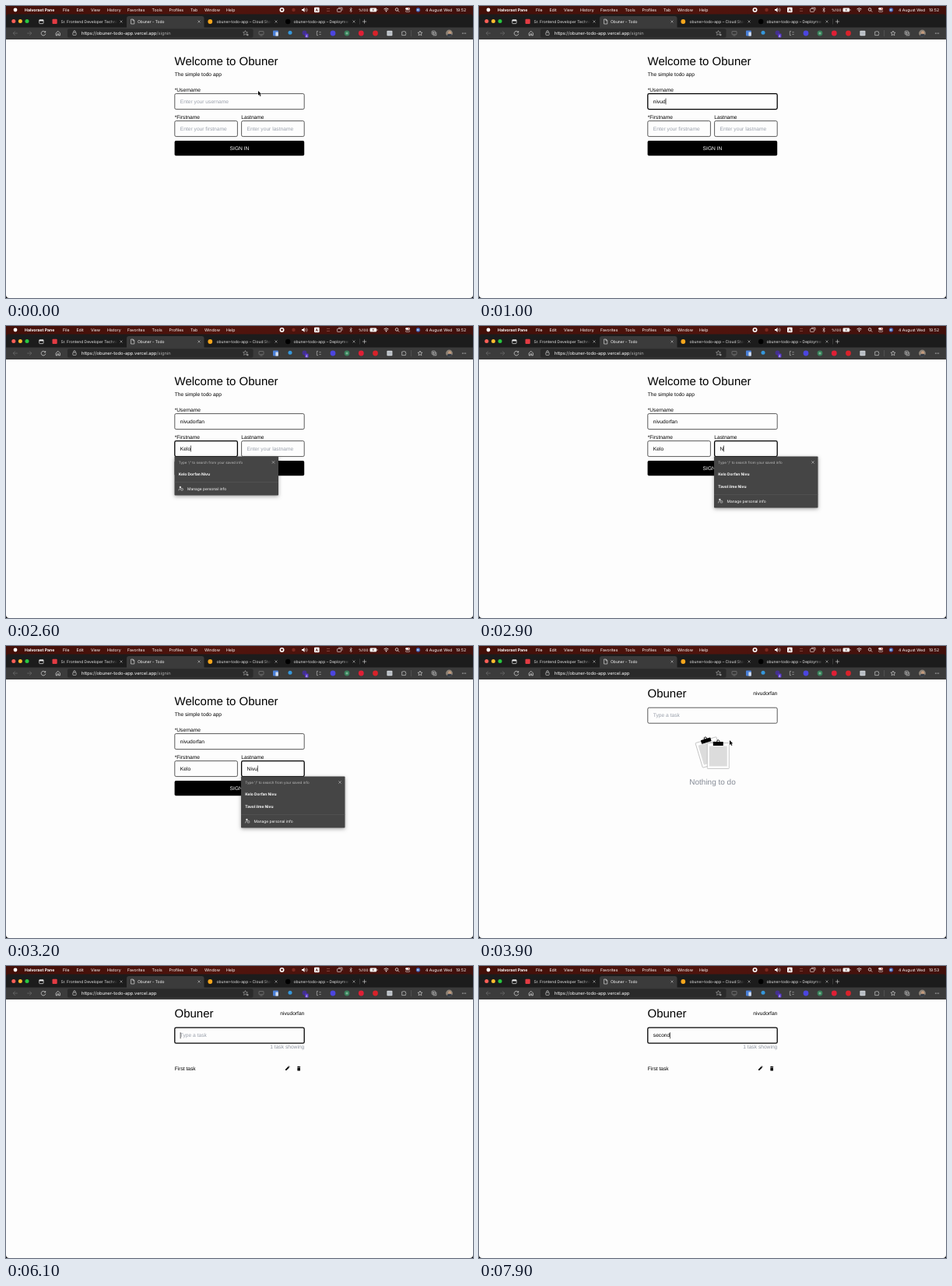
An HTML page with a canvas that plays this animation: 600 by 375 pixels, repeating every 8 s.

```html
<!DOCTYPE html>
<html lang="en">
<head>
<meta charset="utf-8">
<title>Todo app demo</title>
<style>
  html, body { margin: 0; width: 100%; height: 100%; overflow: hidden; background: #fdfdfd; }
  canvas { display: block; width: 600px; height: 375px; }
</style>
</head>
<body>
<canvas id="stage"></canvas>
<script>
const LOOP = 8000;
const UI = 'Inter, sans-serif', PAGE = '"Liberation Sans", Arial, sans-serif';
const GRAY = '#9aa0ab', ICON = '#c4c4c4';
const APP = 'Obuner', HOST = 'https://obuner-todo-app.vercel.app';
const USER = 'nivudorfan', FIRST = 'Kelo', LAST = 'Nivu';

const canvas = document.getElementById('stage');
const ratio = window.devicePixelRatio || 1;
canvas.width = 600 * ratio;
canvas.height = 375 * ratio;
const ctx = canvas.getContext('2d');

function text(str, x, y, { size = 6.667, color = '#000', font = PAGE, weight = 400, align = 'left' } = {}) {
  ctx.font = `${weight} ${size}px ${font}`;
  ctx.fillStyle = color;
  ctx.textAlign = align;
  ctx.fillText(str, x, y);
}
const ui = (str, x, y, size = 5, color = '#fff', weight = 400) =>
  text(str, x, y, { size, color, weight, font: UI });

function rect(x, y, w, h, fill, r = 0) {
  ctx.beginPath();
  ctx.roundRect(x, y, w, h, r);
  ctx.fillStyle = fill;
  ctx.fill();
}
function outline(x, y, w, h, color, width = 0.6, r = 0) {
  ctx.beginPath();
  ctx.roundRect(x, y, w, h, r);
  ctx.strokeStyle = color;
  ctx.lineWidth = width;
  ctx.stroke();
}
function disc(x, y, r, fill) {
  ctx.beginPath();
  ctx.arc(x, y, r, 0, 7);
  ctx.fillStyle = fill;
  ctx.fill();
}
function path(d, x, y, color, width = 0.6) {
  ctx.save();
  ctx.translate(x, y);
  ctx.strokeStyle = color;
  ctx.lineWidth = width;
  ctx.stroke(new Path2D(d));
  ctx.restore();
}
function shape(d, x, y, fill) {
  ctx.save();
  ctx.translate(x, y);
  ctx.fillStyle = fill;
  ctx.fill(new Path2D(d));
  ctx.restore();
}
const cross = (x, y, color = '#ddd', s = 1.5) => path(`M${-s} ${-s}L${s} ${s}M${s} ${-s}L${-s} ${s}`, x, y, color, 0.5);
const STAR = 'M0-3L.9-1L3-.8L1.4.6L1.9 2.8L0 1.6L-1.9 2.8L-1.4.6L-3-.8L-.9-1Z';

const typed = (str, t, start, step) => str.slice(0, Math.max(0, Math.floor((t - start) / step) + 1));
const between = (t, a, b) => t >= a && t < b;

function menuBar(t) {
  const bg = ctx.createLinearGradient(0, 0, 600, 0);
  bg.addColorStop(0, '#431009');
  bg.addColorStop(0.5, '#50140d');
  bg.addColorStop(1, '#40100c');
  rect(0, 0, 600, 15, bg);
  disc(12, 5, 2.4, '#fff');
  ui('Halvorast Pane', 24, 7, 5.2, '#fff', 700);
  const menus = { File: 73, Edit: 90.5, View: 109, History: 130, Favorites: 156, Tools: 187.5, Profiles: 209.5, Tab: 237, Window: 255, Help: 283 };
  for (const [name, x] of Object.entries(menus)) ui(name, x, 7, 5.2);

  disc(354.5, 5, 3, '#fff');
  disc(354.5, 5, 1.4, '#50140d');
  disc(369.5, 5, 2.2, '#7b2a20');
  shape('M-3-1H-1.5L.5-3V3L-1.5 1H-3Z', 383, 5, '#fff');
  path('M0-1.5Q1.5 0 0 1.5M1.5-2.5Q4 0 1.5 2.5', 384.5, 5, '#fff', 0.5);
  rect(396, 1.8, 6.6, 6.4, '#fff', 1);
  ui('A', 397.5, 7, 5, '#50140d', 600);
  path('M-2-1.5H2M-2 1.5H2', 414, 5, '#8d514a', 0.8);
  outline(425.5, 3.5, 5, 4, '#fff', 0.6, 0.8);
  path('M-2-2H3V1.5', 429, 4.2, '#fff', 0.6);
  path('M-1.5-1.5L1.5 1.4L0 2.8V-2.8L1.5-1.4L-1.5 1.5', 443, 5, '#fff', 0.5);
  ui('%100', 453, 6.8, 4.7);
  rect(467.5, 2.6, 8.6, 4.8, '#f2f2f2', 1.2);
  rect(476.6, 4, 0.7, 2, '#ddd');
  shape('M.6-1.8L-1.2.3H0L-.5 1.8L1.2-.3H0Z', 471.8, 5, '#50140d');
  path('M-3-1Q0-3.4 3-1M-1.8.4Q0-1 1.8.4', 488.5, 5, '#fff', 0.8);
  disc(488.5, 6.8, 0.8, '#fff');
  path('M1.4 0A1.8 1.8 0 1 1-2.2 0A1.8 1.8 0 1 1 1.4 0M.9 1.3L2.6 3', 502.5, 4.5, '#fff', 0.7);
  rect(513.2, 2.3, 5.8, 2.4, '#fff', 1.2);
  outline(513.5, 5.6, 5.2, 2, '#fff', 0.5, 1);
  disc(517.5, 3.5, 0.8, '#d83b2b');
  disc(529.5, 5, 2.7, '#4a5fb0');
  disc(529.3, 5, 1.2, '#a8d8ee');
  ui('4 August Wed', 539, 7, 5.1);
  ui(t < 7500 ? '19:52' : '19:53', 578, 7, 5.2);
}

function tabTitle(str, x, right, bg) {
  ui(str, x, 22, 5, '#e6e6e6');
  const rgb = bg.join();
  const fade = ctx.createLinearGradient(right - 10, 0, right, 0);
  fade.addColorStop(0, `rgba(${rgb},0)`);
  fade.addColorStop(1, `rgb(${rgb})`);
  rect(right - 10, 15, 10, 11, fade);
  rect(right, 15, 18, 11, `rgb(${rgb})`);
}

function tabStrip() {
  const dark = [28, 28, 28];
  rect(0, 10.6, 600, 24, '#1c1c1c', [4, 4, 0, 0]);
  ['#ff5f57', '#febc2e', '#28c840'].forEach((c, i) => disc(9.8 + i * 8.6, 19.6, 2.5, c));
  outline(42.7, 17.8, 5.4, 4.8, '#eee', 0.7, 0.8);
  rect(42.7, 17.6, 5.4, 1.8, '#eee');

  tabTitle('Sr. Frontend Developer Technical', 70.5, 143, dark);
  tabTitle('obuner-todo-app – Cloud Storage', 270.5, 341, dark);
  tabTitle('obuner-todo-app – Deployments', 369.5, 441, dark);
  rect(155, 13, 99.5, 16, '#3b3b3b', [3, 3, 0, 0]);
  ui(`${APP} - Todo`, 169, 22, 5);

  rect(59.5, 16.8, 6.2, 6.2, '#e23b43', 1);
  path('M-2-3H.7L2.2-1.4V3H-2ZM.5-3V-1.2H2.2', 162.6, 20, '#eee', 0.6);
  disc(262.3, 20, 2.9, '#f7a61c');
  disc(362.2, 20, 3.2, '#000');
  [148, 248, 347, 447].forEach(x => cross(x, 20));
  rect(454, 16.5, 0.5, 7, '#555');
  path('M-2.6 0H2.6M0-2.6V2.6', 460.5, 20, '#ddd', 0.6);
}

function toolbar(signedIn) {
  rect(0, 27.5, 600, 15.5, '#3b3b3b');
  path('M2.8 0H-2.8M-.2-2.6L-2.8 0L-.2 2.6', 12, 35, '#777');
  path('M-2.8 0H2.8M.2-2.6L2.8 0L.2 2.6', 30, 35, '#777');
  path('M2.4-1.4A2.8 2.8 0 1 0 2.8.6M2.7-3V-1.2H.9', 48, 35, '#ddd', 0.7);
  path('M-2.6-.2L0-2.8L2.6-.2V2.8H.8V.8H-.8V2.8H-2.6Z', 66.8, 35, '#ddd', 0.7);

  rect(79, 29.2, 238.5, 11.6, '#2a2a2a', 2);
  outline(85.8, 34, 4.4, 3.4, '#ddd', 0.6, 0.6);
  path('M-1.2 0V-1.2A1.2 1.2 0 0 1 1.2-1.2V0', 88, 34, '#ddd', 0.6);
  ui(HOST, 97, 37, 5.75);
  if (!signedIn) ui('/signin', 97 + ctx.measureText(HOST).width, 37, 5.75, '#aaa');
  path(STAR, 307.5, 34.6, ICON, 0.5);
  path('M-1.3 0H1.3M0-1.3V1.3', 310.5, 37, ICON, 0.6);

  outline(325, 32.5, 6, 4.2, '#888', 0.6, 0.5);
  path('M-1.5 0H1.5', 328, 38, '#888');
  rect(343, 31.6, 6.8, 6.8, '#4a80d8', 0.8);
  rect(346.4, 33.6, 3.4, 4.8, '#d4dcec', 0.5);
  disc(365, 34.3, 2.5, '#3597dc');
  disc(383.5, 34.5, 2.9, '#43308f');
  rect(384, 35.6, 4.6, 4.8, '#5736c9', 0.8);
  ui('4', 385, 39.6, 4);
  path('M-1-2.6H-2.6V2.6H-1M.5-1.4H2.6M.5 1.4H2.6', 402, 35, '#b0b0b0', 0.7);
  disc(420, 35, 3.4, '#4b45df');
  disc(438, 35, 3.4, '#397f5b');
  disc(438, 35, 1.5, '#7eb796');
  disc(456.3, 35, 3.4, '#e01f35');
  disc(474.5, 35, 3.4, '#d9222a');
  rect(489.4, 31.7, 7, 6.6, '#cfd3d8', 0.8);
  path('M-2.5-1H2.5M-2.5 1H2.5', 493, 35, '#7f8790', 0.6);
  path('M-2.3-2H-.7A1 1 0 0 1 1.1-2H2.4V-.6A1 1 0 0 1 2.4 1.2V2.6H-2.3Z', 511, 35, '#ddd', 0.6);
  rect(520.5, 31, 0.5, 8, '#666');
  path(STAR, 532, 35, '#ddd');
  outline(547.2, 32.2, 4.2, 4.2, '#ddd', 0.6, 0.7);
  path('M-1.4 2.8H2.8V-1.5M-2-.5H.5M-.8-1.8V.8', 550, 35, '#ddd');
  avatar(569.5, 35);
  [-2, 0, 2].forEach(d => disc(588.5 + d, 35, 0.55, '#eee'));
}

function avatar(x, y) {
  ctx.save();
  ctx.beginPath();
  ctx.arc(x, y, 4.4, 0, 7);
  ctx.clip();
  rect(x - 5, y - 5, 10, 10, '#8d8377');
  disc(x + 0.6, y - 0.8, 1.9, '#c59b7e');
  disc(x + 0.4, y + 4.4, 3.6, '#343c46');
  ctx.restore();
}

function field(x, y, w, value, hint, focused, caretOn) {
  outline(x, y, w, 20, '#000', focused ? 1.3 : 0.65, 1.8);
  const tx = x + 7, base = y + 12.2;
  text(value || hint, tx, base, { color: value ? '#000' : GRAY });
  if (focused && caretOn) {
    const end = value ? ctx.measureText(value).width : 0;
    rect(tx + end, y + 6, 0.6, 8, '#000');
  }
}

function popup(x, names) {
  const h = 34 + names.length * 16, y = 167.5;
  ctx.save();
  ctx.shadowColor = 'rgba(0,0,0,.35)';
  ctx.shadowBlur = 5 * ratio;
  ctx.shadowOffsetY = 1.5 * ratio;
  rect(x, y, 133.5, h, '#454545', 0.8);
  ctx.restore();
  ui("Type '/' to search from your saved info", x + 5.3, y + 9.2, 4.5, '#bdbdbd');
  cross(x + 127, y + 7.5, '#ddd', 1.7);
  names.forEach((n, i) => ui(n, x + 5.3, y + 24.2 + i * 16, 4.9, '#fff', 700));
  const foot = y + h - 17.5;
  rect(x, foot, 133.5, 0.5, '#5c5c5c');
  disc(x + 7.4, foot + 7, 1.2, '#ddd');
  path('M-2 2.6Q-2 0 .2 0', x + 7.4, foot + 8.8, '#ddd');
  outline(x + 8.2, foot + 8.6, 2.6, 2.4, '#ddd', 0.6, 0.4);
  ui('Manage personal info', x + 16.5, foot + 10.5, 4.9);
}

function signIn(t) {
  const user = typed(USER, t, 700, 66);
  const first = typed(FIRST, t, 2100, 120);
  const last = typed(LAST, t, 2900, 80);
  text(`Welcome to ${APP}`, 216.5, 76.3, { size: 15 });
  text('The simple todo app', 216.7, 89.5);
  text('*Username', 216.7, 109.5);
  text('*Firstname', 216.7, 144.7);
  text('Lastname', 302.3, 144.7);
  field(216.8, 112.6, 166.4, user, 'Enter your username', between(t, 400, 1500), true);
  field(216.8, 147.6, 80.6, first, 'Enter your firstname', between(t, 1500, 2700), true);
  field(302.6, 147.6, 80.6, last, 'Enter your lastname', t >= 2700, true);
  rect(216.6, 173, 166.6, 19.2, '#000', 1.8);
  text('SIGN IN', 300, 184.9, { color: '#fff', align: 'center' });
  const owner = 'Kelo Dorfan Nivu';
  if (between(t, 2200, 2700)) popup(216.5, [owner]);
  if (t >= 2900) popup(302, [owner, 'Tavol ilme Nivu']);
}

function clipboard(x, y, angle) {
  ctx.save();
  ctx.translate(x, y);
  ctx.rotate(angle);
  rect(-14, -16, 28, 33, '#fff', 0.8);
  outline(-14, -16, 28, 33, '#a5a5a5', 0.6, 0.8);
  rect(-11.5, -12, 23, 26, '#dcdcdc');
  rect(-6.5, -17.5, 13, 5, '#000', 0.6);
  ctx.beginPath();
  ctx.arc(0, -18, 1.7, 0, 7);
  ctx.strokeStyle = '#000';
  ctx.lineWidth = 0.9;
  ctx.stroke();
  ctx.restore();
}

function todo(t) {
  const added = t >= 5800;
  const value = added
    ? typed('secon', t, 6900, 100) + (t >= 7900 ? 'd' : '')
    : (t >= 4900 ? 'F' : '') + typed('irst task', t, 5150, 65);
  text(APP, 216.5, 66.4, { size: 15 });
  text(USER, 383.3, 63.4, { align: 'right' });
  field(216.8, 79.2, 166.4, value, 'Type a task', t >= 4500, !between(t, 6400, 6900));
  if (added) {
    text('1 task showing', 383.3, 106.3, { color: '#8f95a1', align: 'right' });
    text('First task', 216.7, 133.8);
    shape('M-2.5 2.5V1.2L1.1-2.4L2.4-1.1L-1.2 2.5ZM1.4-2.7L2-3.2L3.1-2L2.7-1.4Z', 361.5, 131.5, '#000');
    shape('M-2.1-2.4H-1L-.7-2.9H.7L1-2.4H2.1V-1.7H-2.1ZM-1.8-1.3H1.8V2.2Q1.8 2.8 1.2 2.8H-1.2Q-1.8 2.8-1.8 2.2Z', 376.2, 131.7, '#000');
  } else {
    clipboard(296, 136, -0.29);
    clipboard(307.3, 140.5, 0);
    text('Nothing to do', 300, 178.2, { size: 10, color: '#858b96', align: 'center' });
  }
}

function pointer(x, y) {
  const arrow = 'M0 0V5.9L1.4 4.7L2.4 7L3.4 6.5L2.4 4.3H4.2Z';
  path(arrow, x, y, '#fff', 0.9);
  shape(arrow, x, y, '#000');
}

function mouse(t) {
  const glide = (a, b) => {
    const p = Math.min(1, Math.max(0, (t - a) / (b - a)));
    return p * p * (3 - 2 * p);
  };
  if (t < 700) {
    const p = glide(200, 480);
    pointer(324 - 2 * p, 108.9 + 12 * p);
  } else if (between(t, 3900, 4900)) {
    const p = glide(3900, 4550);
    pointer(322 - 14 * p, 121 - 33 * p);
  }
}

function draw(t) {
  const signedIn = t >= 3500;
  ctx.setTransform(ratio, 0, 0, ratio, 0, 0);
  ctx.textRendering = 'geometricPrecision';
  rect(0, 0, 600, 375, '#000');
  menuBar(t);
  tabStrip();
  toolbar(signedIn);
  rect(0, 43, 600, 332, '#fdfdfd', [0, 0, 4, 4]);
  signedIn ? todo(t) : signIn(t);
  mouse(t);
}

function frame() {
  draw(performance.now() % LOOP);
  requestAnimationFrame(frame);
}
frame();
</script>
</body>
</html>
```
